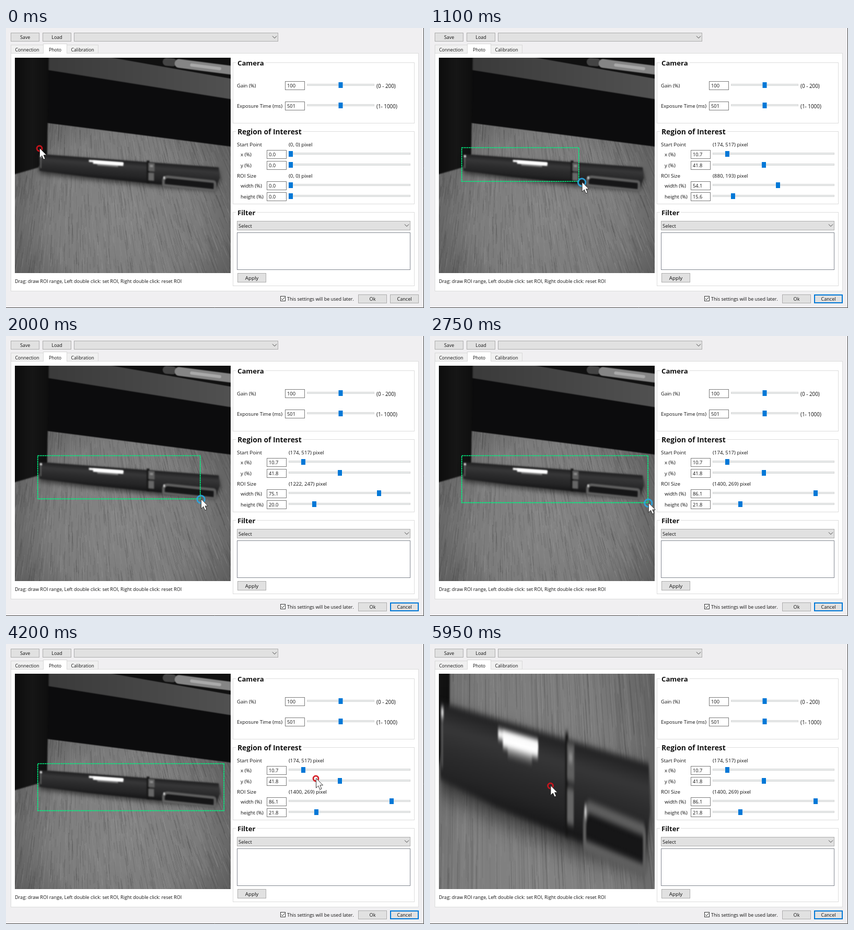
These frames come from a looping animation (800 by 537 pixels, 6 s). An HTML page with a canvas:

```html
<!DOCTYPE html>
<html lang="en">
<head>
<meta charset="utf-8">
<title>Camera settings</title>
<style>
html, body { margin: 0; width: 100%; height: 100%; overflow: hidden; background: #f0eff1; }
canvas, svg { position: absolute; left: 0; top: 0; width: 800px; height: 537px; }
text { font-family: "Open Sans", "Noto Sans", sans-serif; fill: #111; }
</style>
</head>
<body>
<canvas id="view" width="800" height="537"></canvas>
<svg id="over" viewBox="0 0 800 537"></svg>
<script>
const LOOP = 6000, STEP = 50, LAG = 12;
const PRESS = 300, RELEASE = 2900, ZOOM = 5700;
const PHOTO = { x: 17, y: 57, size: 413, span: 414, w: 1626, h: 1236 };
const START = { x: 61.3, y: 230.17 };
const BLUE = '#0078d7';

const ctx = document.getElementById('view').getContext('2d');
const over = document.getElementById('over');

// ---- pointer: a chain of eased glides ----
const GLIDES = [
  { from: 150, to: 300, ...START },
  { from: 463, to: 1420, x: 371.42, y: 312.92, bow: 0.755 },
  { from: 1950, to: 2400, x: 417.77, y: 320.3 },
  { from: 3300, to: 3950, x: 593, y: 258 },
  { from: 4550, to: 5100, x: 151, y: 258 },
  { from: 5100, to: 5400, x: 228, y: 262 },
  { from: 5600, to: 5850, x: 230.5, y: 272 }
];

function pointer(t) {
  const p = { x: 64, y: 231 };
  for (const g of GLIDES) {
    const u = Math.min(1, Math.max(0, (t - g.from) / (g.to - g.from)));
    const e = u * u * (3 - 2 * u);
    p.x += (g.x - p.x) * e;
    p.y += (g.y - p.y) * e ** (g.bow || 1);
  }
  return p;
}

const isHeld = t => (t >= PRESS && t < RELEASE) || (t >= 5400 && t < 5680 && t % 200 < 100);

// ---- still life with a pen ----
function random(seed) {
  return () => (seed = (seed * 16807) % 2147483647) / 2147483647;
}

function paintPhoto() {
  const img = document.createElement('canvas');
  img.width = img.height = PHOTO.span * 2;
  const g = img.getContext('2d'), rnd = random(77);
  g.scale(2, 2);
  g.translate(-PHOTO.x, -PHOTO.y);

  const poly = (fill, ...p) => {
    g.fillStyle = fill;
    g.beginPath();
    for (let i = 0; i < p.length; i += 2) g.lineTo(p[i], p[i + 1]);
    g.fill();
  };
  const slab = (fill, x, y, w, h) => {
    g.fillStyle = fill;
    g.fillRect(x, y, w, h);
  };
  const band = (fill, topL, lowL, topR, lowR) => poly(fill, 76, topL, 433, topR, 433, lowR, 76, lowL);
  const soften = r => { g.filter = `blur(${r}px)`; };
  const ramp = (grad, ...colors) => {
    colors.forEach((c, i) => grad.addColorStop(i / (colors.length - 1), c));
    return grad;
  };

  // wood
  slab(ramp(g.createRadialGradient(225, 350, 20, 225, 350, 270), '#848484', '#7b7b7b', '#525252'),
    PHOTO.x, PHOTO.y, PHOTO.span, PHOTO.span);
  for (let i = 0; i < 1800; i++) {
    const x = 10 + rnd() * 430, y = 170 + rnd() * 300, n = 10 + rnd() * 35;
    g.strokeStyle = rnd() < 0.5 ? 'rgba(30,30,30,.09)' : 'rgba(190,190,190,.08)';
    g.lineWidth = 0.8 + rnd() * 1.4;
    g.beginPath();
    g.moveTo(x, y);
    g.lineTo(x + n * (0.1 + (x - 200) / 700), y + n);
    g.stroke();
  }

  // shelf, things on it, dark cup
  soften(1.5);
  band('#0c0c0d', 50, 182, 50, 228);
  band(ramp(g.createLinearGradient(80, 0, 430, 0), '#3a3a3a', '#454545', '#505050'), 34, 80, 97, 137);
  band('#111', 20, 34, 50, 97);
  g.lineCap = 'round';
  for (let i = 0; i < 3; i++) {
    g.strokeStyle = ['#444', '#858585', '#aaa'][i];
    g.lineWidth = [15, 17, 6][i];
    g.beginPath();
    g.moveTo(308 + 24 * i, 65 + 3 * i);
    g.lineTo([320, 440, 410][i], [66, 82, 78][i]);
    g.stroke();
  }
  soften(2);
  poly(ramp(g.createLinearGradient(17, 0, 83, 0), '#0d0d0d', '#161616', '#0e0e0e'),
    10, 50, 82, 50, 79, 243, 62, 268, 10, 283);

  // pen, in a space sheared along its length
  g.transform(1, 0.075, 0, 1, 63, 242);
  const body = fill => poly(fill, 1, 0, 345, 0, 347, 20, 339, 39, 233, 41, 95, 37, 1, 32);
  g.save();
  g.translate(0, 5);
  soften(10);
  body('rgba(15,15,15,.65)');
  g.restore();
  soften(2.4);
  body(ramp(g.createLinearGradient(0, 0, 0, 40), '#1f1f20', '#373738', '#2c2c2d', '#242425', '#161617'));
  slab('#777', 3, 5, 1.5, 22);
  slab('#eee', 2, 2, 4, 4);
  slab('#777', 112, 9, 40, 5);
  slab('#fff', 96, 4, 66, 4);
  slab('#fff', 104, 5, 58, 6);
  slab('#161616', 207, -3, 5, 43);
  slab('#606060', 210, 1, 12, 16);
  slab('#909090', 213, 5, 6, 4);
  slab('#666', 210, 20, 11, 15);

  // clip
  g.transform(1, 0.03, 0, 1, 234, 24);
  slab('#161617', 8, 3, 94, 14);
  g.strokeStyle = '#606060';
  g.lineWidth = 5;
  g.beginPath();
  g.roundRect(5, 1, 99, 17, [9, 3, 3, 1]);
  g.stroke();
  slab('#ddd', 5, 1, 3, 5);
  return img;
}

// ---- drawing helpers ----
function set(e, attrs) {
  for (const k in attrs) e.setAttribute(k, attrs[k]);
  return e;
}
function add(tag, attrs) {
  return over.appendChild(set(document.createElementNS(over.namespaceURI, tag), attrs));
}
function label(s, x, y, size = 9.6, more = {}) {
  const e = add('text', { x, y, 'font-size': size, ...more });
  e.textContent = s;
  return e;
}
function box(x, y, w, h, fill, line) {
  ctx.fillStyle = fill;
  ctx.strokeStyle = line;
  ctx.fillRect(x, y, w, h);
  ctx.strokeRect(x + 0.5, y + 0.5, w - 1, h - 1);
}
function line(color, ...p) {
  ctx.strokeStyle = color;
  ctx.beginPath();
  for (let i = 0; i < p.length; i += 2) ctx.lineTo(p[i], p[i + 1]);
  ctx.stroke();
}
function caption(s, x, y, w, size) {
  label(s, x + w / 2, y, size, { 'text-anchor': 'middle' });
}
function button(s, x, y, size = 9.1, h = 17) {
  box(x, y, 55, h, '#e1e1e1', '#adadad');
  caption(s, x, y + h / 2 + 3.7, 55, size);
}
function tab(s, x, w, active) {
  const lift = active ? 2 : 0;
  box(x, 32 - lift, w, 17 + lift, active ? '#fff' : '#f0f0f0', '#d9d9d9');
  if (active) {
    ctx.fillStyle = '#fff';
    ctx.fillRect(x + 1, 46, w - 2, 5);
  }
  caption(s, x, 44.6, w, 8.7);
}
function combo(x, y, w, h) {
  box(x, y, w, h, '#e1e1e1', '#adadad');
  const r = x + w - 7;
  line('#444', r - 4, y + 6.5, r, y + 10.5, r + 4, y + 6.5);
}
function group(s, y, h, size) {
  box(434, y, 348, h, '#fff', '#dcdcdc');
  const t = label(s, 443, y + 6, size, { 'font-weight': 700 });
  ctx.fillStyle = '#fff';
  ctx.fillRect(440, y, t.getComputedTextLength() + 6, 1);
}
// a named number field with its slider; y is the middle of the field
function setting(name, x, y, fieldX, value, trackX, trackEnd) {
  label(name, x, y + 4.3, 9.5);
  box(fieldX, y - 8, 38, 17, '#fff', '#7a7a7a');
  box(trackX, y - 3, trackEnd - trackX, 4, '#e7eaea', '#d9d9d9');
  return {
    text: label(value, fieldX + 4, y + 4.3, 9.3),
    knob: add('rect', { x: (trackX + trackEnd) / 2 - 4, y: y - 6, width: 8, height: 11, fill: BLUE })
  };
}

// ---- window ----
ctx.fillStyle = '#f0eff1';
ctx.fillRect(0, 0, 800, 537);
button('Save', 9, 9, 8.9);
button('Load', 70, 9, 8.9);
combo(130, 9, 391, 17);
box(9, 48, 781, 457, '#fff', '#dcdcdc');
tab('Connection', 9, 63);
tab('Calibration', 116, 61);
tab('Photo', 71, 46, true);

group('Camera', 66, 117, 13.2);
[['Gain (%)', '100', '(0 - 200)'], ['Exposure Time (ms)', '501', '(1- 1000)']].forEach(([name, value, range], i) => {
  const y = 110 + 39 * i;
  setting(name, 442, y, 534, value, 576, 705);
  label(range, 709, y + 4.5, 9.9);
});

group('Region of Interest', 198, 140, 13.8);
const pixels = ['Start Point', 'ROI Size'].map((s, i) => {
  const y = 227 + 60 * i;
  label(s, 442, y, 9.8);
  return label('', 541, y, 9.7);
});
const rows = ['x (%)', 'y (%)', 'width (%)', 'height (%)'].map((s, i) =>
  setting(s, 449, 242 + 21 * (i % 2) + 60 * (i >> 1), 499, '', 541, 774));

group('Filter', 353, 142, 13);
combo(442, 370, 332, 18);
label('Select', 445, 383, 9.4);
box(442, 392, 332, 72, '#fff', '#828790');
button('Apply', 443, 470, 9.8, 18);
label('Drag: draw ROI range, Left double click: set ROI, Right double click: reset ROI', 17, 489, 9.05);
box(525, 514, 10, 10, '#fff', '#333');
line('#222', 527, 519, 529.3, 521.4, 533, 516.5);
label('This settings will be used later.', 538, 523, 9);
button('Ok', 674, 511);
button('Cancel', 735, 511);
line('#444', 0, 536.5, 799.5, 536.5, 799.5, 0);

const focus = add('rect', { x: 736, y: 512, width: 53, height: 15, fill: 'none', stroke: BLUE, 'stroke-width': 2 });
const roi = add('rect', { x: 60.7, y: 229.5, fill: 'none', stroke: '#00f080', 'stroke-width': 1.6, 'stroke-dasharray': '3.6 .8' });
const ring = add('circle', { fill: 'none', 'stroke-width': 3, 'stroke-opacity': 0.92 });
const arrow = add('path', {
  d: 'M0 0V18.5L4.3 14.4 7.3 21.5 10.5 20.2 7.5 13.3H13Z',
  fill: '#fff', stroke: '#222', 'stroke-width': 0.9
});
const photo = paintPhoto();

// ---- moving parts ----
const show = (e, on) => e.setAttribute('visibility', on ? 'visible' : 'hidden');

function showPhoto(zoomed) {
  const { x, y, size, span } = PHOTO;
  const crop = zoomed ? [(START.x - x) * 2, (START.y - y) * 2, 713, 180] : [0, 0, span * 2, span * 2];
  ctx.drawImage(photo, ...crop, x, y, size, size);
}

function showRegion(t) {
  const on = t >= PRESS, end = pointer(Math.min(t, RELEASE) - LAG);
  const w = on ? Math.max(0, end.x - START.x) : 0;
  const h = on ? Math.max(0, end.y - START.y) : 0;
  const part = [on ? START.x - PHOTO.x : 0, on ? START.y - PHOTO.y : 0, w, h].map(v => v / PHOTO.span);
  const px = part.map((p, i) => Math.round(p * (i % 2 ? PHOTO.h : PHOTO.w)));
  pixels.forEach((e, i) => { e.textContent = `(${px[2 * i]}, ${px[2 * i + 1]}) pixel`; });
  rows.forEach((r, i) => {
    r.text.textContent = (part[i] * 100).toFixed(1);
    r.knob.setAttribute('x', Math.round(541 + part[i] * 224.5));
  });
  set(roi, { width: w, height: h });
  show(roi, on && t < ZOOM);
}

function draw(t) {
  const p = pointer(t), held = isHeld(t);
  showPhoto(t >= ZOOM);
  showRegion(t);
  show(focus, t >= PRESS);
  set(ring, {
    cx: p.x, cy: p.y,
    r: held ? Math.min(7.2, 4.6 + (t - PRESS) % 5100 / 120) : 4.9,
    stroke: held ? '#2aa5e0' : '#d3141c'
  });
  arrow.setAttribute('transform', `translate(${p.x + 0.5} ${p.y - 0.5})`);
}

let begin;
function tick(now) {
  begin ??= now;
  draw(Math.floor(((now - begin) % LOOP) / STEP) * STEP);
  requestAnimationFrame(tick);
}
draw(0);
requestAnimationFrame(tick);
</script>
</body>
</html>
```
